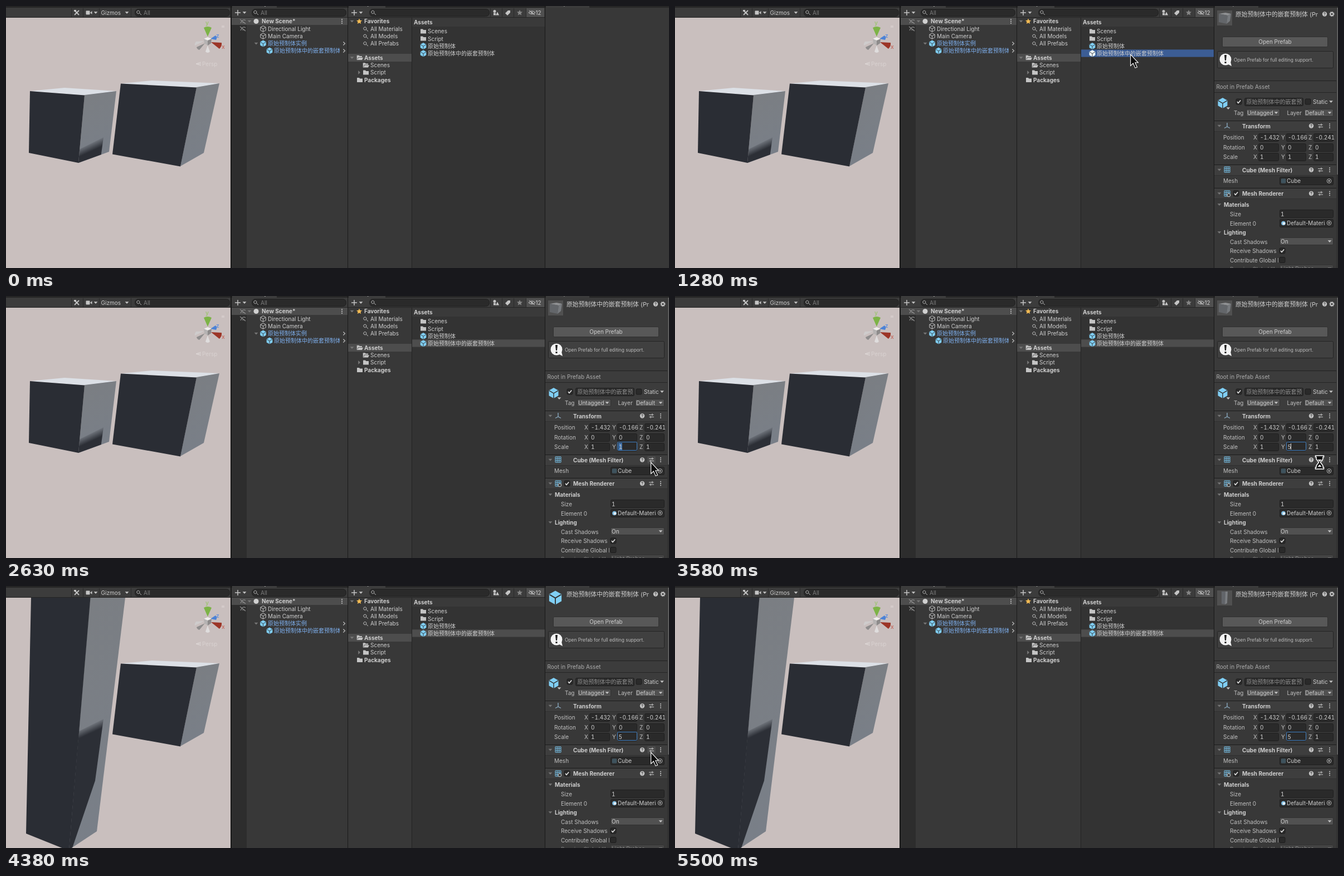
Animation, 1190 px wide and 471 px high, one loop 6100 ms. Source, as an HTML page:

```html
<!DOCTYPE html>
<html lang="zh-CN">
<head>
<meta charset="utf-8">
<title>Nested prefab scale</title>
<style>
html, body { margin: 0; width: 100%; height: 100%; overflow: hidden; background: #383838; }
svg { display: block; width: 1190px; height: 471px; }
text { font: 10px Inter, "Noto Sans CJK SC", "Noto Sans CJK", sans-serif; fill: #cfcfcf; white-space: pre; }
.b { font-weight: 700; }
.link { fill: #7fb1f0; }
.dim { fill: #7c7c7c; }
.name { fill: #8e8e8e; font-weight: 500; }
.num { font-variant-numeric: tabular-nums; }
.label { fill: #c0c0c0; }
.mini { font-size: 8.4px; fill: #bdbdbd; }
.title { font-size: 10.83px; }
.win { font-family: "Open Sans", "Noto Sans CJK SC", "Noto Sans CJK", sans-serif; font-weight: 500; fill: #000; }
.line { fill: none; stroke: #c4c4c4; }
#dialog { filter: drop-shadow(0 3px 6px #0006); }
</style>
</head>
<body>
<svg id="stage" viewBox="0 0 1190 471">
<defs>
  <g id="box">
    <path d="M0-6 5.3-3V3L0 6-5.3 3V-3Z"/>
    <path d="M0 6V.3L-5-2.7M0 .3 5-2.7" fill="none" stroke="#333" stroke-width=".9"/>
  </g>
  <path id="object" class="line" d="M0-5.3 4.7-2.7V2.7L0 5.3-4.7 2.7V-2.7ZM0 5V0L-4.7-2.7M0 0 4.7-2.7"/>
  <path id="folder" d="M-5-4H-1L.3-2.6H5V4H-5Z"/>
  <path id="openFolder" d="M-5.3 4V-4.2H-1.5L-.3-3H4V-1H-2.6L-4.6 3H-4L-2.2-.2H6L4 4Z"/>
  <path id="down" d="M-3.4-1.7H3.4L0 1.9Z"/>
  <path id="right" d="M-1.8-3.4V3.4L2 0Z"/>
  <path id="next" d="M-1.7-3 1.5 0-1.7 3" class="line" stroke-width="1.1"/>
  <path id="find" class="line" d="M1.4.6A2.6 2.6 0 1 1 1.4-2.6 2.6 2.6 0 0 1 1.4.6L5 4"/>
  <path id="plus" class="line" stroke-width="1.5" d="M-5 0H5M0-5V5"/>
  <path id="star" d="M0-5 1.5-1.7 5-1.4 2.4 1 3.2 4.6 0 2.7-3.2 4.6-2.4 1-5-1.4-1.5-1.7Z"/>
  <g id="help"><circle r="4.2" fill="#c4c4c4"/><path d="M-1.4-1Q-1.2-2.5 0-2.5T1.3-1.2Q1.2-.4 0 .3V1M0 1.8V2.7" fill="none" stroke="#383838"/></g>
  <path id="preset" class="line" d="M-4.5-2H4M1.5-4.2V0M-4 2H4.5M-1.5 0V4.2"/>
  <path id="dots" d="M-.9-4.2H.9V-2.4H-.9ZM-.9-.9H.9V.9H-.9ZM-.9 2.4H.9V4.2H-.9Z" fill="#c4c4c4"/>
  <path id="grid" d="M-5-5H5V5H-5ZM-1.7-5V5M1.7-5V5M-5-1.7H5M-5 1.7H5" fill="none" stroke="#79c4ec"/>
  <g id="picker"><circle r="3.8" class="line" stroke-width=".9"/><circle r="1.4" fill="#c4c4c4"/></g>
  <path id="tick" d="M-3 0-1 2.4 3.2-2.6" fill="none" stroke="#e2e2e2" stroke-width="1.6"/>
  <linearGradient id="side" x2=".3" y2="1"><stop stop-color="#7b7e82"/><stop offset="1" stop-color="#797f88"/></linearGradient>
  <linearGradient id="edge" gradientUnits="userSpaceOnUse" x1="149" y1="249" x2="155.500" y2="263">
    <stop stop-color="#2c2f36" stop-opacity="0"/><stop offset="1" stop-color="#2c2f36"/>
  </linearGradient>
  <clipPath id="view"><path d="M0 21H404V471H0Z"/></clipPath>
  <clipPath id="smallSide"><path d="M141 160 198 153 185 262 130 282Z"/></clipPath>
  <clipPath id="tallSide"><path d="M151 21H214L163 441 113 474Z"/></clipPath>
  <clipPath id="treeClip"><path d="M405 21H599V471H405Z"/></clipPath>
  <clipPath id="nameClip"><path d="M1023 165H1126V180H1023Z"/></clipPath>
  <clipPath id="matClip"><path d="M1085 383H1167V398H1085Z"/></clipPath>
  <clipPath id="labelClip"><path d="M968 400H1083V471H968Z"/></clipPath>
</defs>
</svg>
<script>
const LOOP = 6100;
const ASSET = "原始预制体中的嵌套预制体";
const stage = document.getElementById("stage");

const text = (x, y, s, cls = "", extra = "") => `<text x="${x}" y="${y}" class="${cls}" ${extra}>${s}</text>`;
const rect = (x, y, w, h, fill, extra = "") => `<rect x="${x}" y="${y}" width="${w}" height="${h}" fill="${fill}" ${extra}/>`;
const icon = (id, x, y, fill = "#c4c4c4", extra = "") => `<use href="#${id}" x="${x}" y="${y}" fill="${fill}" ${extra}/>`;
const poly = (d, fill, extra = "") => `<path d="${d}" fill="${fill}" ${extra}/>`;
const stroke = (d, color = "#c4c4c4", w = 1) => `<path d="${d}" fill="none" stroke="${color}" stroke-width="${w}"/>`;
const group = (on, ...parts) => `<g data-on="${on}">${parts.join("")}</g>`;
const frame = (x, y, w, h, fill, border, rx = 2) =>
  rect(x + .5, y + .5, w - 1, h - 1, fill, `stroke="${border}" rx="${rx}"`);
const field = (x, y, w, h = 15) => frame(x, y, w, h, "#2a2a2a", "#202020");
const drop = (x, y, w, s) => frame(x, y, w, 14, "#515151", "#303030") + text(x + 2, y + 10.5, s) + icon("down", x + w - 7, y + 7);
const check = (x, y, on) => frame(x - 5.5, y - 5.5, 11, 11, "#2a2a2a", "#1c1c1c") + (on ? icon("tick", x, y) : "");
const search = (x, w, s) => frame(x, 5, w, 14, "#2a2a2a", "#202020", 6) +
  icon("find", x + 7, 12, "none", 'style="stroke-width:.9"') + text(x + 16, 15.5, s, "dim");

function sceneView() {
  const gizmo = [
    ["M355 39Q362 35 369 39L362 55Z", "#7db347"], ["M368 65 387 66Q388 72 383 77Z", "#9c3527"],
    ["M367 59 376 53Q380 56 377 61Z", "#4b82d6"], ["M356 63 341 64Q338 68 339 71Z", "#cfcccc"],
    ["M357 67 342 74Q343 78 347 79Z", "#8f8d8d"], ["M358 82Q362 86 366 82L362 71Z", "#dfdddd"],
    ["M355 59 362 56 369 59 362 62Z", "#f0eeee"], ["M355 59 362 62V71L356 67Z", "#b5b2b2"], ["M369 59 362 62V71L368 67Z", "#8d8a8a"]
  ];
  const shadow = poly("M129 262 175 239 160 350 119 471 105 476Z", "url(#edge)");
  return `<g clip-path="url(#view)">` + rect(0, 21, 404, 450, "#c9bfbe") +
    group("0-4310",
      poly("M43 153 105 147 198 153 141 160.5Z", "#dce0e6"),
      poly("M141 160 198 153 185 262 130 282Z", "url(#side)"),
      `<g clip-path="url(#smallSide)"><g transform="translate(0 -3)">${shadow}</g></g>`,
      poly("M43 153 141 160.5 130 282 41 264Z", "#2a2d34")) +
    group("4310-6100",
      poly("M151 21H214L163 441 113 474Z", "url(#side)"),
      `<g clip-path="url(#tallSide)">${shadow}</g>`,
      poly("M45 21H151.500L113 476 36 445Z", "#2a2d34")) +
    poly("M206 139.500 262 134 383 139 342 146.500Z", "#dce0e6") +
    poly("M342 146 383 139 355 264 313 288Z", "url(#side)") +
    poly("M206 139.500 342 146.500 313 288.500 191 266.500Z", "#2a2d34") +
    gizmo.map(g => poly(...g)).join("") +
    text(358, 34, "y", "b", 'style="fill:#a3c47c"') + text(377, 57, "z", "b", 'style="fill:#6d94d8"') +
    text(387, 77, "x", "b", 'style="fill:#c4796f"') + text(352, 108, "Persp", "", 'style="fill:#d9d2d1"') +
    stroke("M350 101 341 104 350 107M342 104H350", "#ded8d7") + rect(387, 35, 5, 4, "#d3cac9") + "</g>";
}

function toolbars() {
  const tabs = [[406, 80], [615, 66], [969, 78]].map(([x, w]) => rect(x, 0, w, 3, "#3c3c3c")).join("");
  const seps = [117, 138, 167, 224, 869, 890, 911, 933].map(x => rect(x, 4, 1, 16, "#2a2a2a")).join("");
  return rect(0, 0, 1190, 3, "#262626") + tabs + rect(0, 3, 967, 18, "#3c3c3c") + rect(0, 20, 967, 1, "#242424") +
    text(423, -1, "Hierarchy") + text(633, -1, "Project") + text(987, -1, "Inspector") + seps +
    stroke("M123 8 131 16M131 8 123 16", "#c4c4c4", 1.8) + rect(122, 7, 4, 3, "#c4c4c4") +
    rect(143.5, 8.5, 7, 7, "#c4c4c4", 'rx="1"') + poly("M151 12 154.500 9V15Z", "#c4c4c4") + icon("down", 161, 12) +
    text(170.5, 15.5, "Gizmos") + icon("down", 217, 12) + search(231, 171, "All") +
    icon("plus", 416, 12) + icon("down", 428, 12) + search(441, 170, "All") +
    icon("plus", 625, 12) + icon("down", 637, 12) + search(652, 216, "") +
    `<circle cx="877" cy="9.500" r="2.500" fill="#c4c4c4"/>` + rect(875, 12.5, 4, 4, "#c4c4c4") + poly("M879 16.500 882 10.500 885 16.500Z", "#c4c4c4") +
    poly("M896 13 901 8H905V12L900 17Z", "#c4c4c4") + icon("star", 922, 12, "#858585") +
    rect(934, 4, 32, 16, "#505050") + stroke("M938 12Q944 6 950 12 944 17 938 12M939 8 949 16") +
    `<circle cx="944" cy="12" r="1.600" fill="#c4c4c4"/>` + text(950.5, 15.5, "12");
}

function hierarchy() {
  const hidden = y => stroke(`M420 ${y - 4} 430 ${y + 4}M421 ${y + 3}Q425 ${y - 6} 430 ${y - 2}M424 ${y + 2}H429`, "#8c8c8c", 1.2);
  return rect(405, 21, 208, 450, "#383838") + rect(405, 21, 27, 450, "#2d2d2d") + rect(405, 21, 208, 13, "#4d4d4d") +
    hidden(28) + hidden(41) + icon("down", 437, 27.5, "#777") +
    `<circle cx="449" cy="27.500" r="4.500" fill="#d0d0d0"/>` + text(459, 31, "New Scene*", "b") + icon("dots", 603, 27.5) +
    icon("object", 461.5, 41) + text(470, 44.5, "Directional Light") +
    icon("object", 461.5, 54) + text(470, 57.5, "Main Camera") +
    icon("down", 449, 67.5, "#777") + icon("box", 461.5, 67.5, "#80cff5") + text(470, 71, "原始预制体实例", "link") + icon("next", 607, 67.5) +
    icon("box", 473, 80.5, "#80cff5") + `<g clip-path="url(#treeClip)">${text(481, 84.2, ASSET, "link")}</g>` + icon("next", 607, 80.5);
}

function project() {
  const favs = ["All Materials", "All Models", "All Prefabs"].map((s, i) =>
    icon("find", 645, 41.5 + i * 13.3) + text(654, 44.5 + i * 13.3, s)).join("");
  const selection = color => rect(729, 78.3, 238, 13.3, color);
  return rect(614, 21, 115, 450, "#383838") + rect(729, 21, 238, 450, "#333") + rect(729, 21, 238, 16, "#3a3a3a") +
    icon("down", 621, 27.5, "#777") + icon("star", 634, 27.5, "#f5bd54") + text(643, 31, "Favorites", "b") + favs +
    rect(614, 86, 114, 14, "#4d4d4d") + icon("down", 621, 93, "#777") + icon("openFolder", 635, 93) + text(643, 96.5, "Assets", "b") +
    icon("openFolder", 646, 106.5) + text(654, 110, "Scenes") +
    icon("right", 634, 119.5, "#777") + icon("folder", 646, 119.5) + text(654, 123, "Script") +
    icon("folder", 635, 133) + text(643, 136.5, "Packages", "b") + rect(728, 21, 1, 450, "#232323") +
    text(732, 32.5, "Assets", "b") + icon("folder", 749, 45.5) + text(757, 49, "Scenes") +
    icon("folder", 749, 58.5) + text(757, 62.5, "Script") + icon("box", 749, 72, "#80cff5") + text(757, 75.7, "原始预制体") +
    group("1010-2420", selection("#3c5d95")) + group("2420-6100", selection("#4d4d4d")) +
    icon("box", 749, 85.3, "#80cff5") + group("1010-2420", icon("box", 749, 85.3, "#eef7fc")) + text(757, 89.2, ASSET);
}

function inspector() {
  const header = (y, s, art) => {
    const top = Math.round(y - 10);
    return rect(968, top, 219, 20, "#3e3e3e") + rect(968, top, 219, 1, "#1c1c1c") + rect(968, top + 19, 219, 1, "#303030") +
      icon("down", 977, y, "#777") + art + text(1018, y + 4, s, "b") + icon("help", 1142, y) + icon("preset", 1158.5, y) + icon("dots", 1175, y);
  };
  const vector = (y, name, values) => text(984, y + 4, name, "label") + values.map((v, i) => {
    const x = 1047 + Math.round(i * 49.5);
    return text(x - 9, y + 4, "XYZ"[i], "label") + field(x, Math.round(y - 7), i ? 36 : 37) + text(x + 3, y + 4, v, "num");
  }).join("");
  const fold = (y, s) => icon("down", 977, y, "#777") + text(985, y + 4, s, "b");
  const row = (y, s) => text(996, y + 4, s, "label");
  const tile = rect(973, 8, 27, 27, "#505050");

  return group("1080-6100",
    rect(968, 3, 222, 468, "#383838"), rect(968, 3, 219, 131, "#3a3a3a"),
    group("1080-1280 4310-4440", icon("box", 0, 0, "#80cff5", 'transform="translate(986 21) scale(2.100)"')),
    group("1280-4310", tile, poly("M976 14 988 12 998 14 992 17Z", "#8f9193"), poly("M976 14 992 17 990 32 976 29Z", "#63666a"), poly("M992 17 998 14 996 27 990 32Z", "#777a7e")),
    group("4440-6100", tile, poly("M981 10 988 10 987 33 981 32Z", "#62656a"), poly("M988 10 992 10 991 31 987 33Z", "#7b7e82")),
    text(1006, 19, ASSET + " (Pr", "title"), icon("help", 1166, 14.5),
    `<circle cx="1179" cy="14.500" r="2.700" class="line" stroke-width="2"/><circle cx="1179" cy="14.500" r="4.200" class="line" stroke-dasharray="1.650"/>`,
    frame(982, 55, 190, 19, "#585858", "#303030"), text(1077, 68, "Open Prefab", "", 'text-anchor="middle"'),
    frame(973, 81, 209, 31, "#404040", "#242424"),
    `<circle cx="988" cy="96" r="10.500" fill="#f4f4f4"/>`, poly("M991 104 999 108 997 100Z", "#f4f4f4"),
    poly("M986 88H990L989 98H987Z", "#222"), rect(986.5, 100, 3, 3, "#222"),
    text(1003, 100, "Open Prefab for full editing support.", "mini"),
    rect(968, 134, 219, 1, "#202020"), rect(968, 135, 219, 20, "#3c3c3c"), rect(968, 155, 219, 1, "#252525"), rect(968, 156, 219, 50, "#3c3c3c"),
    text(971.5, 149, "Root in Prefab Asset", "", 'style="fill:#adadad"'),
    icon("box", 0, 0, "#80cff5", 'transform="translate(983 174.500) scale(1.600)"'), icon("down", 993, 184),
    check(1012, 172, true), field(1022, 165, 106), `<g clip-path="url(#nameClip)">${text(1025.5, 176.3, ASSET, "name")}</g>`,
    check(1136, 172), text(1145, 176, "Static"), icon("down", 1177.5, 172),
    text(1003, 196, "Tag", "label"), drop(1025, 185, 61, "Untagged"), text(1098.5, 196, "Layer", "label"), drop(1129, 185, 53, "Default"),
    header(215.5, "Transform", stroke("M991 217V210M991 217 996 219.500M991 217 986 219.500", "#8fb0c8", 1.3)),
    vector(236, "Position", ["-1.432", "-0.166", "-0.241"]), vector(254, "Rotation", [0, 0, 0]), vector(270.5, "Scale", [1, "", 1]),
    group("2220-2420", frame(1097, 262, 36, 16, "#2a2a2a", "#656565")),
    group("2420-6100", frame(1097, 262, 36, 16, "#2a2a2a", "#4384c9")),
    group("2420-3380", rect(1099, 264, 7, 13, "#3d6fa8")),
    group("1080-3380", text(1100, 274.5, "1", "num")), group("3380-6100", text(1099.5, 274.5, "5", "num")),
    group("3380-4310", rect(1105, 265, 1, 11, "#ddd")),
    header(294.5, "Cube (Mesh Filter)", icon("grid", 991, 294)),
    group("2630-5030", rect(1151, 288, 15, 13, "#4b4b4b", 'rx="2"'), icon("preset", 1158.5, 294.5)),
    text(984, 318, "Mesh", "label"), field(1085, 307, 97), icon("grid", 0, 0, "none", 'transform="translate(1092 314.500) scale(.700)" opacity=".5"'),
    text(1098, 318, "Cube"), icon("picker", 1174, 314.5),
    header(337, "Mesh Renderer", icon("grid", 991, 337) + `<circle cx="994" cy="340" r="2.800" fill="#383838" stroke="#d0d0d0"/>` + check(1007, 337, true)),
    fold(357, "Materials"), row(373.5, "Size"), field(1085, 366, 97), text(1087, 377.5, "1", "num"),
    row(390.5, "Element 0"), field(1085, 383, 97), `<circle cx="1092" cy="390.500" r="3.800" fill="#80bfe4"/><circle cx="1093" cy="391" r="2.300" fill="#e9eef2"/>`,
    `<g clip-path="url(#matClip)">${text(1098, 394, "Default-Material")}</g>`, icon("picker", 1174, 390),
    fold(407, "Lighting"), row(423.5, "Cast Shadows"), drop(1085, 416, 97, "On"),
    row(440, "Receive Shadows"), check(1090, 440, true),
    `<g clip-path="url(#labelClip)">${row(456.5, "Contribute Global Illumination")}<g opacity=".5">${row(473, "Receive Global Illumination")}</g></g>`,
    check(1090, 456.5), `<g opacity=".5">${drop(1085, 465, 97, "Light Probes")}</g>`,
    rect(1187, 3, 3, 468, "#323232"), rect(1188, 3, 2, 300, "#5e5e5e"));
}

function overlay() {
  return `<g id="dialog">` + frame(250, 320, 298, 72, "#f0f0f0", "#6e6e6e", 0) + rect(251, 321, 296, 25, "#fff") +
    text(257.5, 336.5, "Importing", "win") + frame(260, 355, 279, 12, "#e6e6e6", "#bcbcbc", 0) +
    text(260, 379, `${ASSET}<tspan style="font-size:9px">.prefab</tspan>`, "win") + "</g>" +
    `<g id="pointer">` +
    group("940-1080", `<circle r="10" fill="#cdbf12" opacity=".8"/>`) +
    group("340-2220 2490-3580 4240-5500", poly("M.6 1.2V21.500L5.300 17 9 25.400 12.500 24 8.800 15.800H14.300Z", "#0a0a0a", 'stroke="#fff" stroke-width="1.100"')) +
    group("2220-2490", stroke("M-3-7H3M0-7V7M-3 7H3", "#ddd", 1.2)) +
    group("3580-4240", poly("M-7.500-11H7.500V-8.500H6V-5L1.500 1 6 7V10H7.500V13H-7.500V10H-6V7L-1.500 1-6-5V-8.500H-7.500Z", "#0c0c0c", 'stroke="#fff" stroke-width="1.500"') + poly("M-3.500-4H3.500L0 0ZM-3.500 9 0 5 3.500 9Z", "#fff")) +
    "</g>";
}

stage.insertAdjacentHTML("beforeend", sceneView() + toolbars() + hierarchy() + project() + inspector() +
  [[403, 2], [613, 1], [967, 1]].map(([x, w]) => rect(x, 0, w, 471, "#191919")).join("") + overlay());

// Each move: start, end, step count, way points
const moves = [
  [340, 940, 10, [[1112, 437], [1085, 405], [1015, 310], [915, 180], [840, 105], [817, 86]]],
  [1610, 2020, 7, [[817, 86], [860, 120], [965, 200], [1065, 272], [1111, 301], [1116, 285]]],
  [2220, 2220, 1, [[1114, 271], [1114, 271]]],
  [2490, 2630, 3, [[1114, 271], [1157, 298]]],
  [5030, 5500, 8, [[1157, 298], [1158, 325], [1164, 385], [1171, 440], [1176, 475]]]
];

function pointerAt(t) {
  const [start, end, steps, points] = moves.findLast(m => t >= m[0]) || moves[0];
  const gap = steps > 1 ? (end - start) / (steps - 1) : 1;
  const done = Math.max(0, Math.min(steps, Math.floor((t - start) / gap + 1e-6) + 1));
  const at = done / steps * (points.length - 1);
  const i = Math.min(points.length - 2, Math.floor(at));
  return [0, 1].map(k => Math.round(points[i][k] + (points[i + 1][k] - points[i][k]) * (at - i)));
}

const timed = [...stage.querySelectorAll("[data-on]")].map(el => ({
  el, spans: el.dataset.on.split(" ").map(s => s.split("-").map(Number))
}));
const dialog = document.getElementById("dialog");
const pointer = document.getElementById("pointer");
const began = performance.now();

function draw() {
  const t = (performance.now() - began) % LOOP;
  for (const { el, spans } of timed) el.style.display = spans.some(([a, b]) => t >= a && t < b) ? "" : "none";
  dialog.setAttribute("opacity", t < 4240 || t >= 4380 ? 0 : t < 4310 ? 1 : .35);
  pointer.setAttribute("transform", `translate(${pointerAt(t)})`);
  requestAnimationFrame(draw);
}
draw();
</script>
</body>
</html>
```
